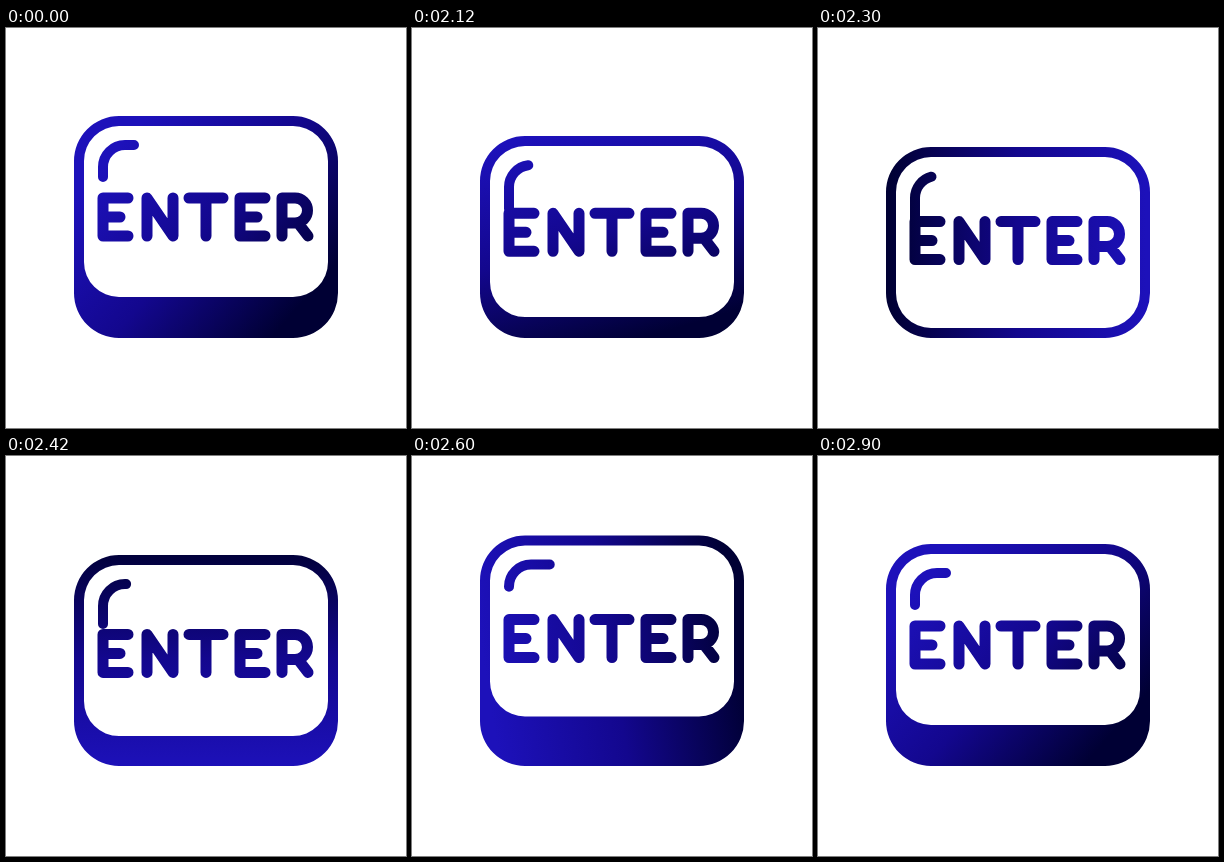
These frames come from a looping animation (400x400 px, 2960 ms). An HTML page:

```html
<!DOCTYPE html>
<html lang="en">
<head>
<meta charset="utf-8">
<title>Enter key</title>
<style>
  html, body { margin: 0; width: 100%; height: 100%; overflow: hidden; background: #fff; }
  svg { display: block; width: 100vw; height: 100vh; }
  .line { fill: none; stroke: url(#ink); stroke-width: 10; stroke-linecap: round; stroke-linejoin: round; }
  #word { stroke-width: 11; }
</style>
</head>
<body>
<svg viewBox="0 0 400 400" role="img" aria-label="ENTER">
  <defs>
    <linearGradient id="ink" gradientUnits="userSpaceOnUse">
      <stop offset="0" stop-color="#1d11ba"/>
      <stop offset=".5" stop-color="#13078e"/>
      <stop offset="1" stop-color="#000034"/>
    </linearGradient>
  </defs>
  <path id="cap" fill="url(#ink)" fill-rule="evenodd"/>
  <path id="shine" class="line"/>
  <path id="word" class="line"/>
</svg>
<script>
  const LOOP = 2960, START = 2030, STEP = 30;
  const REST_TOP = 88, BOTTOM = 310;
  const get = id => document.getElementById(id);
  const ink = get('ink'), cap = get('cap'), shine = get('shine'), word = get('word');

  const linear = u => u;
  const smooth = u => u * u * (3 - 2 * u);

  // Keys are [time, value] pairs
  const DROP = [[2000, 0], [2200, 31], [2300, 31], [2540, -8.8], [2560, -8.8], [2900, 0]];
  const TURN = [[2000, 0], [2180, 45], [2300, 135], [2420, 225], [2600, 305], [2900, 360]];

  function at(keys, t, ease) {
    if (t <= keys[0][0]) return keys[0][1];
    for (let i = 1; i < keys.length; i++) {
      const [t0, v0] = keys[i - 1], [t1, v1] = keys[i];
      if (t < t1) return v0 + (v1 - v0) * ease((t - t0) / (t1 - t0));
    }
    return keys[keys.length - 1][1];
  }

  function roundRect(x, y, w, h, r) {
    const c = (dx, dy) => `a${r} ${r} 0 0 1 ${dx} ${dy}`;
    return `M${x + r} ${y}h${w - 2 * r}${c(r, r)}v${h - 2 * r}${c(-r, r)}` +
           `h${2 * r - w}${c(-r, -r)}v${2 * r - h}${c(r, -r)}z`;
  }

  function letters(y) {
    const e = x => `M${x + 25} ${y}h-25v38h25M${x} ${y + 19}h17`;
    return e(97) +
      `M141 ${y + 38}v-38l26 38v-38` +
      `M183 ${y}h34M200 ${y}v38` +
      e(234) +
      `M276 ${y + 38}v-38h13a12.5 12.5 0 0 1 0 25h-13M292 ${y + 25}l10 13`;
  }

  // Highlight: a fixed length sliding around the rounded corner
  function highlight(y, slide) {
    const r = 22, arc = r * Math.PI / 2, cx = 97 + r, cy = y + r;
    const point = s => {
      if (s < 0) return [97, cy - s];
      if (s > arc) return [cx + s - arc, y];
      return [cx - r * Math.cos(s / r), cy - r * Math.sin(s / r)];
    };
    const from = slide - 10, to = arc + 9 + slide;
    const arcFrom = point(Math.max(from, 0)), arcTo = point(Math.min(to, arc));
    return `M${point(from)}L${arcFrom}A${r} ${r} 0 0 1 ${arcTo}L${point(to)}`;
  }

  function draw(t) {
    const drop = at(DROP, t, smooth), top = REST_TOP + drop;
    cap.setAttribute('d',
      roundRect(68, top, 264, BOTTOM - top, 45) + roundRect(78, top + 10, 244, 171, 35));
    shine.setAttribute('d', highlight(top + 29, 18.5 * (Math.exp(-drop / 20) - 1)));
    word.setAttribute('d', letters(170 + drop * 0.76));

    const a = (at(TURN, t, linear) - 135) * Math.PI / 180;
    const dx = 128 * Math.cos(a), dy = 112 * Math.sin(a);
    ink.setAttribute('x1', 200 + dx);
    ink.setAttribute('y1', 202 + dy);
    ink.setAttribute('x2', 200 - dx);
    ink.setAttribute('y2', 202 - dy);
  }

  const origin = performance.now();
  function tick() {
    const t = Math.max(0, performance.now() - origin) % LOOP;
    draw(t < START ? 0 : START + Math.floor((t - START) / STEP) * STEP);
    requestAnimationFrame(tick);
  }
  tick();
</script>
</body>
</html>
```
